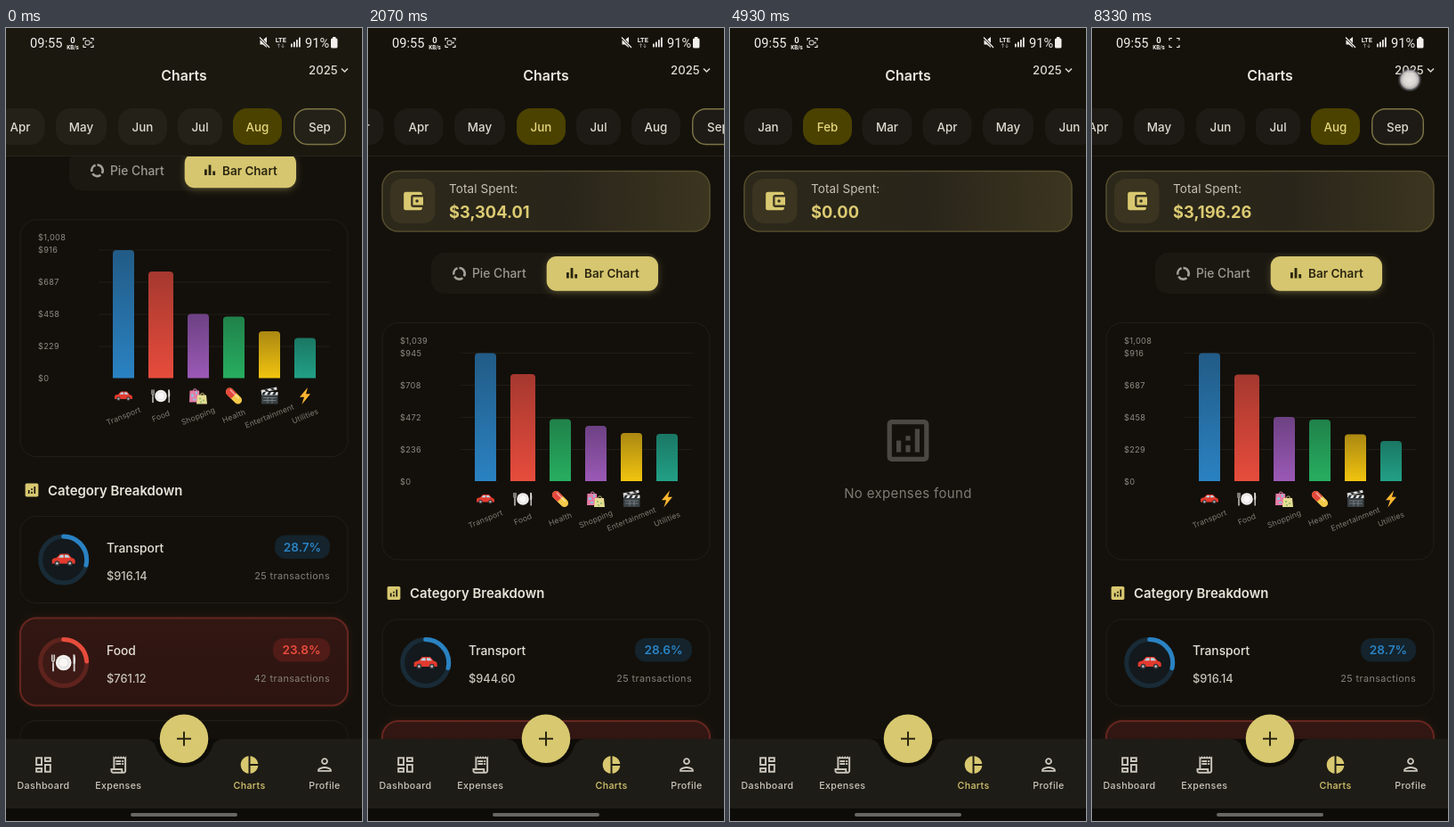
These frames come from a looping animation (400x889 px, 8.4 s). An HTML page:

```html
<!DOCTYPE html>
<html lang="en">
<head>
<meta charset="utf-8">
<title>Expense charts</title>
<style>
  html, body { margin: 0; width: 100%; height: 100%; overflow: hidden; background: #14110c; }
  svg { display: block; width: 400px; height: 889px; }
  text { font-family: Inter, "Open Sans", sans-serif; }
  .sys { font-family: Roboto, "Noto Sans", sans-serif; }
</style>
</head>
<body>
<svg id="stage" viewBox="0 0 400 889" xmlns="http://www.w3.org/2000/svg"></svg>
<script>
const LOOP = 8400;
const GOLD = '#d8c870', INK = '#2b2610';

const ICONS = {
  dashboard: 'M19 5v2h-4V5h4M9 5v6H5V5h4m10 8v6h-4v-6h4M9 17v2H5v-2h4M21 3h-8v6h8V3zM11 3H3v10h8V3zm10 8h-8v10h8V11zm-10 4H3v6h8v-6z',
  receipt: 'M19.5 3.5L18 2l-1.5 1.5L15 2l-1.5 1.5L12 2l-1.5 1.5L9 2 7.5 3.5 6 2v14H3v3c0 1.66 1.34 3 3 3h12c1.66 0 3-1.34 3-3V2zM15 20H6c-.55 0-1-.45-1-1v-1h10zm4-1c0 .55-.45 1-1 1s-1-.45-1-1v-3H8V5h11zM9 7h6v2H9zm7 0h2v2h-2zm-7 3h6v2H9zm7 0h2v2h-2z',
  pie: 'M11 2v20c-5.07-.5-9-4.79-9-10s3.93-9.5 9-10zm2.03 0v8.99H22c-.47-4.74-4.24-8.52-8.97-8.99zm0 11.01V22c4.74-.47 8.5-4.25 8.97-8.99z',
  person: 'M12 6c1.1 0 2 .9 2 2s-.9 2-2 2-2-.9-2-2 .9-2 2-2m0 10c2.7 0 5.8 1.29 6 2H6c.23-.72 3.31-2 6-2m0-12C9.79 4 8 5.79 8 8s1.79 4 4 4 4-1.79 4-4-1.79-4-4-4zm0 10c-2.67 0-8 1.34-8 4v2h16v-2c0-2.66-5.33-4-8-4z',
  analytics: 'M19 3H5c-1.1 0-2 .9-2 2v14c0 1.1.9 2 2 2h14c1.1 0 2-.9 2-2V5c0-1.1-.9-2-2-2zm0 16H5V5h14zM7 12h2v5H7zm8-5h2v10h-2zm-4 7h2v3h-2zm0-4h2v2h-2z',
  analyticsFill: 'M19 3H5c-1.1 0-2 .9-2 2v14c0 1.1.9 2 2 2h14c1.1 0 2-.9 2-2V5c0-1.1-.9-2-2-2zM9 17H7v-5h2zm4 0h-2v-3h2zm0-5h-2v-2h2zm4 5h-2V7h2z',
  wallet: 'M21 18v1c0 1.1-.9 2-2 2H5c-1.11 0-2-.9-2-2V5c0-1.1.89-2 2-2h14c1.1 0 2 .9 2 2v1h-9c-1.11 0-2 .9-2 2v8c0 1.1.89 2 2 2zm-9-2h10V8H12zm4-2.5c-.83 0-1.5-.67-1.5-1.5s.67-1.5 1.5-1.5 1.5.67 1.5 1.5-.67 1.5-1.5 1.5z'
};

const rect = (x, y, w, h, r, fill, extra = '') =>
  `<rect x="${x}" y="${y}" width="${w}" height="${h}" rx="${r}" fill="${fill}" ${extra}/>`;
const circle = (x, y, r, fill, extra = '') => `<circle cx="${x}" cy="${y}" r="${r}" fill="${fill}" ${extra}/>`;
const path = (d, fill, extra = '') => `<path d="${d}" fill="${fill}" ${extra}/>`;
const line = (d, color, width, extra = '') => path(d, 'none', `stroke="${color}" stroke-width="${width}" ${extra}`);
const text = (s, x, y, size, fill, { w = 400, a = 'start', ls = 0, extra = '' } = {}) =>
  `<text x="${x}" y="${y}" font-size="${size}" font-weight="${w}" fill="${fill}" text-anchor="${a}" letter-spacing="${ls}" ${extra}>${s}</text>`;
const icon = (name, x, y, scale, fill) =>
  path(ICONS[name], fill, `transform="translate(${x} ${y}) scale(${scale}) translate(-12 -12)"`);
const at = (x, y, scale, body) => `<g transform="translate(${x} ${y}) scale(${scale})">${body}</g>`;
const vGradient = (id, top, bottom) =>
  `<linearGradient id="${id}" x1="0" y1="0" x2="0" y2="1"><stop stop-color="${top}"/><stop offset="1" stop-color="${bottom}"/></linearGradient>`;

// Small pictures centred on 0,0, about 20 units wide
const PICTURES = {
  Transport:
    path('M-10 3V0Q-9-1.6-6-1.8L-3-5H4L7-1.6Q10-1 10 1V3.4H-10z', '#e23a2e') +
    path('M-4.6-1.7L-2.4-4H0V-1.7zM1-4H3.6L5.6-1.7H1z', '#b9d9e8') +
    circle(-5.6, 3.2, 2.2, '#34383b') + circle(5.4, 3.2, 2.2, '#34383b') +
    circle(-5.6, 3.2, 1.1, '#b8bcc0') + circle(5.4, 3.2, 1.1, '#b8bcc0'),
  Food:
    circle(0, 0, 6.8, '#f1efed') + circle(0, 0, 4.5, '#d9d7d5') + circle(0, 0, 3.9, '#f8f7f5') +
    line('M-9 0V7.5M9.2-7V7.5', '#d5d3d0', 1.4) + line('M-10.2-7V-2Q-9 1-7.8-2V-7M-9-7V0', '#d5d3d0', .8) +
    path('M8.4-7.5Q11-5 10 1H8.4z', '#e3e1de'),
  Shopping:
    line('M-6-5Q-4-11-1-5', '#c77aa0', 1.1) + path('M-9.5-6H1L2 7H-10z', '#e57ca6') +
    path('M-8-2h3v3h-3zM-3-5h2v3h-2zM-6 3h3v2h-3z', '#8fc1dd') +
    line('M2-.5Q4.5-6 7-.5', '#b6a970', 1.1) + path('M-1-1H9L10 9H-2z', '#e6dc93') +
    path('M1 2h2v2H1zM5 4h2v2H5zM2 6h2v2H2z', '#9abf73'),
  Health:
    `<g transform="rotate(45)">${rect(-11, -4.4, 22, 8.8, 4.4, '#f3c94a')}` +
    path('M0-4.4H-6.6A4.4 4.4 0 0 0-6.6 4.4H0z', '#e4483c') + rect(-8, -2.9, 14, 1.7, .8, '#fff', 'opacity=".5"') + '</g>',
  Entertainment:
    rect(-9, -1.5, 18.5, 10.5, 1, '#3a4145') + rect(-9, -4.5, 18.5, 3.5, .5, '#e8e8e8') +
    path('M-7-4.5h3l-2 3.5h-3zM-1-4.5h3L0-1h-3zM5-4.5h3L6-1H3z', '#2b3033') +
    path('M-9.5-6.4L8-10l.7 3L-9-4z', '#dedede') + path('M-6-7.1l3-.6 2.2 2-3 .6zM1-8.5l3-.7L6-7l-3 .6z', '#2b3033') +
    line('M-7 2H7.5M-7 5H7.5M-2 2V8M3 2V8', '#8c9498', .7),
  Utilities: path('M3-9.5L-6 1.2H-1L-3.6 9.5 6-2.2H1z', '#fdb62f')
};

const COLORS = {
  Transport: ['#225b86', '#2a82c2'], Food: ['#a5382f', '#e74c3c'], Shopping: ['#6d4183', '#9b59b6'],
  Health: ['#20814a', '#27ae60'], Entertainment: ['#ab8812', '#f1c40f'], Utilities: ['#1a7764', '#22a086']
};

const REPORTS = {
  Jun: {
    total: '$3,304.01', axis: ['$1,039', '$945', '$708', '$472', '$236', '$0'],
    bars: { Transport: 143.5, Food: 120, Health: 69.5, Shopping: 62, Entertainment: 54, Utilities: 53 },
    cards: [['Transport', '$944.60', 28.6, 25, 64], ['Food', '$792.30', 24, 42, 64]]
  },
  Aug: {
    total: '$3,196.26', axis: ['$1,008', '$916', '$687', '$458', '$229', '$0'],
    bars: { Transport: 143.5, Food: 119.5, Shopping: 72, Health: 69, Entertainment: 52.5, Utilities: 45 },
    cards: [['Transport', '$916.14', 28.7, 25, 62], ['Food', '$761.12', 23.8, 42, 64]]
  }
};

const CHIPS = [['Jan', 16, 54], ['Feb', 82, 55], ['Mar', 148.5, 56], ['Apr', 216.5, 55], ['May', 284, 57],
  ['Jun', 354, 55], ['Jul', 421, 50], ['Aug', 483, 55], ['Sep', 551, 59]];

// Timeline: [time, value]
const MONTH = [[0, 'Aug'], [860, 'Jun'], [2200, 'Apr'], [2900, 'Feb'], [5080, 'Apr'], [6270, 'Jun'], [7740, 'Aug']];
const STRIP = [[0, 228], [860, 228], [1060, 187], [2200, 187], [2500, 50], [2990, 50], [3300, 0],
  [5080, 0], [5340, 50], [6270, 50], [6570, 187], [7740, 187], [8040, 237]];
const LIFT = [[0, 115.5], [530, 115.5], [830, 1], [1330, 1], [1500, 0]];
// [from, to, x, y]
const TAPS = [[770, 900, 152, 112], [2110, 2240, 57, 113], [2860, 3000, 55, 117], [3930, 4140, 376, 100],
  [4990, 5120, 243, 113], [6180, 6310, 330, 112], [7650, 7780, 322, 112], [8270, 8400, 357, 58]];

const ease = p => p * p * (3 - 2 * p);
const held = (keys, t) => keys.filter(k => k[0] <= t).pop()[1];
function tween(keys, t) {
  const i = keys.findIndex(k => k[0] > t);
  if (i < 0) return keys[keys.length - 1][1];
  const [t0, v0] = keys[i - 1], [t1, v1] = keys[i];
  return v0 + (v1 - v0) * ease((t - t0) / (t1 - t0));
}

function totalCard(total) {
  return rect(16, 160.5, 368, 67.5, 18, 'url(#totalFill)', 'stroke="#554d2c" stroke-width="1.5"') +
    rect(25, 169, 50.5, 50, 13, '#3a3420') + icon('wallet', 50.5, 194, 1.15, GOLD) +
    text('Total Spent:', 91, 185, 13.5, '#c6c1b2', { ls: .1 }) +
    text(total, 91, 213, 18.3, '#dccb72', { w: 700 });
}

function toggle() {
  const donut = line('M102.5 269A6.2 6.2 0 0 1 107.9 278.3M106.4 280.2A6.2 6.2 0 0 1 97.2 278.6M96.4 276.5A6.2 6.2 0 0 1 100.6 269.3', '#a5a197', 2.6);
  return rect(71, 252, 256, 46, 15, '#1b1812') + rect(201, 258, 125, 39, 11, GOLD, 'filter="url(#glow)" opacity=".28"') +
    rect(200.7, 256, 125.3, 38.8, 11, '#d6c66f') + donut +
    text('Pie Chart', 117, 280, 13.8, '#9d998f', { w: 500 }) +
    rect(223, 274, 2.8, 6.5, 0, INK) + rect(227.6, 269, 2.8, 11.5, 0, INK) + rect(232.3, 276, 2.8, 4.5, 0, INK) +
    text('Bar Chart', 243, 280, 13.5, INK, { w: 600 });
}

function barChart({ axis, bars }) {
  const levels = [350, 364, 400, 436, 472, 508];
  let out = rect(16, 330.5, 368, 265.5, 18, '#13100b', 'stroke="#211e18"');
  levels.forEach((y, i) => {
    out += text(axis[i], 36, y + 3.6, 9.2, '#8d8a82', { ls: .3 });
    if (i > 0 && i < 5) out += line(`M104 ${y + .5}H364`, '#201d17', 1);
  });
  let left = 120;
  for (const [name, h] of Object.entries(bars)) {
    const w = name === 'Food' ? 28 : 24, cx = left + w / 2, top = 508 - h;
    out += path(`M${left} 508V${top + 4}q0-4 4-4h${w - 8}q4 0 4 4V508z`, `url(#bar${name})`) +
      at(cx, 528, 1, PICTURES[name]) +
      text(name, cx, 553.5, 8.6, '#7f7b73', { a: 'middle', ls: .15, extra: `transform="rotate(-22 ${cx} 550.5)"` });
    left += w + 16;
  }
  return out;
}

function categoryCard([name, amount, percent, count, pillWidth], y) {
  const food = name === 'Food', color = COLORS[name][1], c = 2 * Math.PI * 26;
  const frame = food
    ? rect(16, y, 368, 98, 18, '#e74c3c', 'filter="url(#glow)" opacity=".14"') +
      rect(16, y, 368, 98, 18, 'url(#foodFill)', 'stroke="#67261f" stroke-width="2"')
    : rect(16, y, 368, 97, 18, '#13100b', 'stroke="#211e18"');
  const cy = y + (food ? 50 : 48.5), dy = food ? 1.5 : 0;
  return frame + circle(64.7, cy, 26, food ? '#3d1a16' : '#13191c', `stroke="${food ? '#5e231d' : '#182b37'}" stroke-width="5"`) +
    circle(64.7, cy, 26, 'none', `stroke="${color}" stroke-width="5" stroke-linecap="round" stroke-dasharray="${c * percent / 100} ${c}" transform="rotate(-90 64.7 ${cy})"`) +
    at(64.7, cy, 1.3, PICTURES[name]) +
    text(name, 113, y + 40 + dy, 13.8, '#e4e0d6', { w: 500 }) +
    text(amount, 113, y + 71 + dy, 12.8, '#c8c4ba', { w: 500 }) +
    rect(364 - pillWidth, y + 21 + dy, pillWidth, 26.5, 12, food ? '#511b17' : '#14232c') +
    text(percent.toFixed(1) + '%', 364 - pillWidth / 2, y + 39.3 + dy, 13.6, color, { w: 600, a: 'middle' }) +
    text(count + ' transactions', 364, y + 70 + dy, 10.8, '#85827a', { a: 'end', ls: .4 });
}

function page(month) {
  const report = REPORTS[month];
  if (!report) {
    return totalCard('$0.00') + icon('analytics', 200, 462.5, 2.6, '#4b4843') +
      text('No expenses found', 200, 526.5, 15, '#7e7b74', { a: 'middle', ls: .35 });
  }
  return totalCard(report.total) + toggle() + barChart(report) +
    icon('analyticsFill', 29, 633.5, .82, GOLD) +
    text('Category Breakdown', 47, 639, 14.9, '#e8e4da', { w: 600 }) +
    categoryCard(report.cards[0], 663) + categoryCard(report.cards[1], 777) +
    rect(16, 892, 368, 97, 18, '#13100b', 'stroke="#211e18"');
}

const chips = month => CHIPS.map(([name, x, w]) => {
  const on = name === month;
  const fill = on ? '#4b4200' : 'rgba(255,255,255,.04)';
  const body = name === 'Sep'
    ? rect(x + .7, 90.7, w - 1.4, 39.8, 15, fill, 'stroke="#7d7545" stroke-width="1.4"')
    : rect(x, 90, w, 41, 16, fill);
  return body + text(name, x + w / 2, 115.7, 13.4, on ? '#e6d87c' : '#dedad0', { w: 500, a: 'middle' });
}).join('');

function statusBar() {
  const white = '#f2f0ec', sys = 'class="sys"';
  return text('09:55', 27, 21.5, 14.6, white, { extra: sys }) +
    text('0', 75, 17, 9.5, white, { w: 700, a: 'middle', extra: sys }) +
    text('KB/s', 75, 23.5, 6.3, white, { w: 700, a: 'middle', extra: sys }) +
    line('M87 14V11.5H90M95 11.5H98V14M98 19V21.5H95M90 21.5H87V19', white, 1.1) +
    `<g id="camera">${rect(89.2, 14.2, 4.8, 4.6, 1, 'none', `stroke="${white}" stroke-width="1"`)}${path('M94.5 16.5l2-1.6v3.2z', white)}</g>` +
    path('M285.5 13.5H288.5L293 10V22L288.5 18.5H285.5z', white) + line('M285 10.5L296 22', '#14110c', 2.6) + line('M285 10.5L296 22', white, 1.2) +
    text('LTE', 308.8, 15.5, 7.4, white, { w: 700, a: 'middle', extra: sys }) +
    line('M306.5 22V17.8M305 19.2L306.5 17.6L308 19.2M311 17.6V21.8M309.5 20.4L311 22L312.5 20.4', '#8c8a85', .9) +
    [4, 6, 8.5, 11].map((h, i) => rect(320 + i * 3, 21.5 - h, 1.8, h, .4, white)).join('') +
    text('91%', 336, 21.5, 14.6, white, { extra: sys }) +
    rect(365, 11.5, 7.5, 11, 1.5, white) + rect(367, 10, 3.5, 2, .5, white);
}

function navBar() {
  const item = (name, label, x, color = '#c9c5bb') =>
    icon(name, x, 826, .98, color) + text(label, x, 853, 10.7, color, { w: 500, a: 'middle', ls: .35 });
  return rect(0, 797, 400, 92, 0, '#0e0c08') +
    path('M0 797H154Q165 797 168 805A33.5 33.5 0 0 0 232 805Q235 797 246 797H400V875H0z', '#1e1c16') +
    item('dashboard', 'Dashboard', 42) + item('receipt', 'Expenses', 126.3) +
    item('pie', 'Charts', 273.5, GOLD) + item('person', 'Profile', 358) +
    circle(200, 796.8, 27.3, GOLD) + line('M192 796.8H208M200 788.8V804.8', INK, 2) +
    rect(140, 880, 120, 4, 2, '#696761');
}

const stage = document.getElementById('stage');
stage.innerHTML = `<defs>
  <linearGradient id="totalFill"><stop stop-color="#2c281a"/><stop offset=".55" stop-color="#29251a"/><stop offset="1" stop-color="#3c3520"/></linearGradient>
  ${vGradient('foodFill', '#321713', '#2c1410')}
  ${Object.entries(COLORS).map(([name, c]) => vGradient('bar' + name, ...c)).join('')}
  <filter id="glow" x="-20%" y="-40%" width="140%" height="180%"><feGaussianBlur stdDeviation="4"/></filter>
  <radialGradient id="tapFill"><stop stop-color="#f6f4f1"/><stop offset=".6" stop-color="#e6e3df"/><stop offset=".85" stop-color="#bdbabb"/><stop offset="1" stop-color="#77767c" stop-opacity=".6"/></radialGradient>
  </defs>
  ${rect(0, 0, 400, 889, 0, '#14110c')}
  <g id="page"></g>
  <rect id="header" width="400" height="143"/>${line('M0 143.5H400', '#25221b', 1)}
  <g id="strip"></g>
  ${statusBar()}
  ${text('Charts', 200, 59, 15.9, '#ece8df', { w: 600, a: 'middle' })}
  ${text('2025', 340, 52, 13.2, '#dedad0', { w: 500 })}${line('M377 45.5L380.5 49L384 45.5', '#dedad0', 1.5)}
  ${navBar()}
  <g id="tap">${circle(0, 0, 13, '#8a8a92', 'opacity=".3"')}${circle(0, 0, 11.5, 'url(#tapFill)', 'opacity=".92"')}</g>`;

const [pageEl, header, strip, camera, tap] = ['page', 'header', 'strip', 'camera', 'tap'].map(id => document.getElementById(id));
let shown;

function render(t) {
  const month = held(MONTH, t);
  const offset = REPORTS[month] ? tween(LIFT, t) : 0;
  if (month !== shown) {
    shown = month;
    pageEl.innerHTML = page(month);
    strip.innerHTML = chips(month);
  }
  pageEl.setAttribute('transform', `translate(0 ${-offset})`);
  strip.setAttribute('transform', `translate(${-tween(STRIP, t)} 0)`);
  header.setAttribute('fill', offset > .5 ? '#1b1810' : '#15120c');
  camera.setAttribute('opacity', t < 6670 ? 1 : 0);
  const touch = TAPS.find(([from, to]) => t >= from && t < to);
  tap.setAttribute('visibility', touch ? 'visible' : 'hidden');
  if (touch) tap.setAttribute('transform', `translate(${touch[2]} ${touch[3]})`);
}

const start = performance.now();
function tick() {
  render((performance.now() - start) % LOOP);
  requestAnimationFrame(tick);
}
tick();
</script>
</body>
</html>
```
